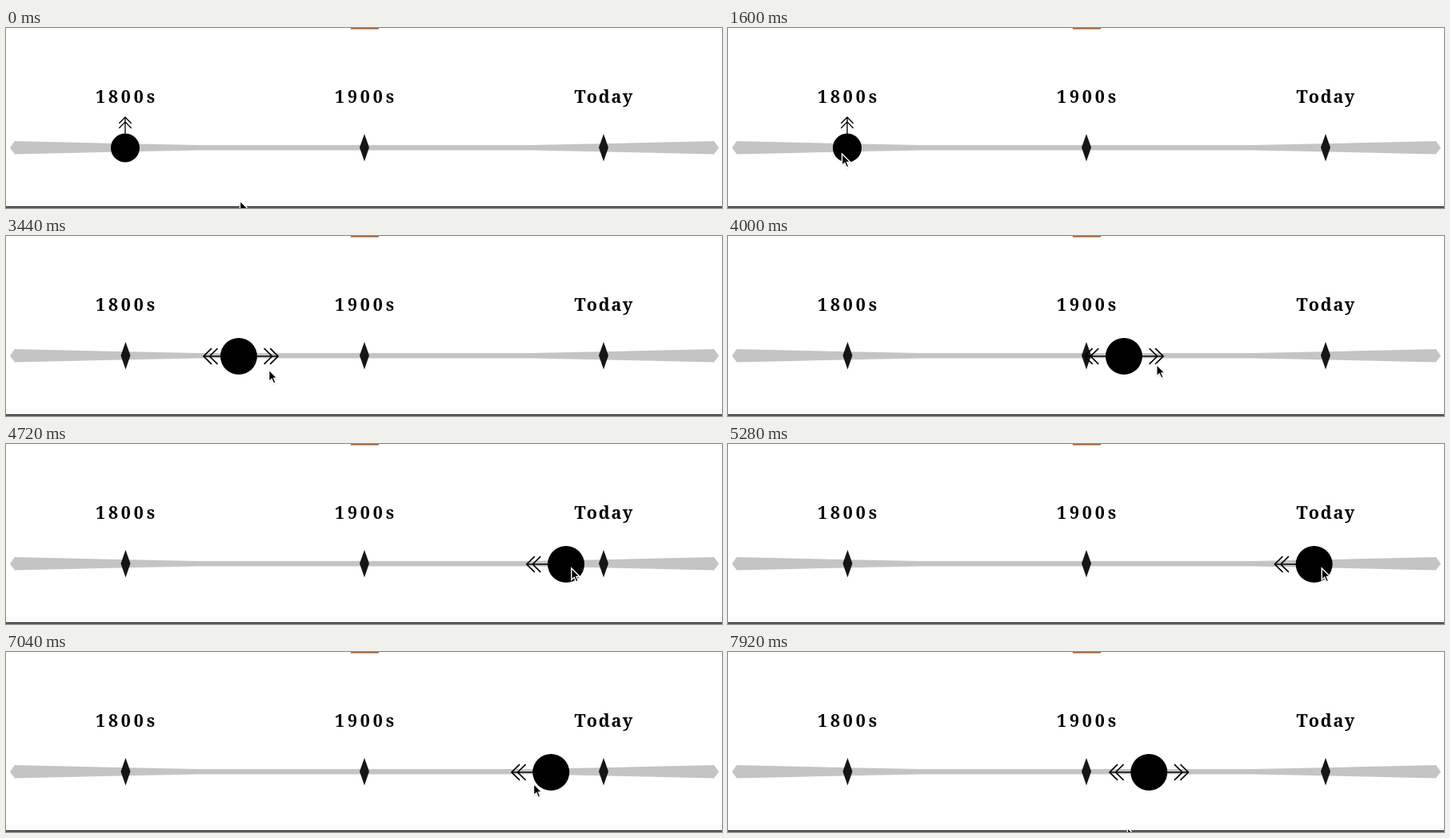
Recreate the animation shown at these times as an HTML page with a canvas. Size 895 px wide and 226 px high, loop 8000 ms.

```html
<!DOCTYPE html>
<html lang="en">
<head>
<meta charset="utf-8">
<title>Timeline slider</title>
<style>
  html, body { margin: 0; width: 100%; height: 100%; overflow: hidden; background: #fff; }
  canvas { display: block; }
</style>
</head>
<body>
<canvas id="stage" width="895" height="226"></canvas>
<script>
const ctx = document.getElementById('stage').getContext('2d');
const LOOP = 8000, STEP = 80;
const CENTER = 448, GAP = 299, AXIS_Y = 150.5;
const FIRST = CENTER - GAP, LAST = CENTER + GAP;
const REST_R = 18, DRAG_R = 23;

const clamp = v => Math.max(0, Math.min(1, v));

// Eased progress from 0 to 1 between two times
function ease(t, from, to) {
  const u = clamp((t - from) / (to - from));
  return u * u * (3 - 2 * u);
}

// Slow pull, fast sweep, slow approach, snap into place, then back
function knobX(t) {
  return FIRST
    + 115 * ease(t, 2000, 3440)
    + 436 * ease(t, 3210, 4730)
    + 34 * ease(t, 4700, 5360)
    + 14 * ease(t, 5440, 5760)
    - 228 * ease(t, 6460, 8080);
}

// 0 while parked on a marker, 1 while being dragged
function dragAmount(t) {
  return ease(t, 2000, 2320) - ease(t, 5440, 5760) + ease(t, 6560, 6880);
}

// The hand reaches the knob, leads it right, lets go, then leads it back
function pointerX(t) {
  return 292
    - 152 * ease(t, 0, 160)
    + 2 * ease(t, 720, 1600)
    + 156 * ease(t, 2000, 3440)
    + 407 * ease(t, 3200, 4640)
    + 38 * ease(t, 4640, 5360)
    - 16 * ease(t, 6060, 6220)
    - 230 * ease(t, 6500, 8000);
}

function pointerY(t) {
  return 217
    - 14 * ease(t, 0, 160)
    - 45 * ease(t, 720, 1600)
    + 11 * ease(t, 2000, 3440)
    - 13 * ease(t, 3200, 4640)
    + 2 * ease(t, 6060, 6220)
    + 63 * ease(t, 6800, 7920);
}

function polygon(points, color) {
  ctx.beginPath();
  points.forEach(([x, y]) => ctx.lineTo(x, y));
  ctx.closePath();
  ctx.fillStyle = color;
  ctx.fill();
}

function label(text, x, spacing) {
  ctx.letterSpacing = spacing + 'px';
  ctx.fillText(text, x, 94);
}

function drawTimeline() {
  // One half of the tapered bar, mirrored around the center
  const taper = [[208, 3.3], [318, 5.5], [437, 8.2], [443, 0]];
  for (const side of [-1, 1]) {
    const edge = sign => taper.map(([x, h]) => [CENTER + side * x, 150.2 + sign * h]);
    polygon([[CENTER, 146.9], ...edge(-1), ...edge(1).reverse(), [CENTER, 153.5]], '#c4c4c4');
  }
  for (const x of [FIRST + 0.5, CENTER, LAST])
    polygon([[x, 133], [x + 6, 150], [x, 167.5], [x - 6, 150]], '#161616');

  ctx.fillStyle = '#000';
  ctx.font = 'bold 21.5px "Noto Serif", serif';
  label('1800s', FIRST - 37, 3.9);
  label('1900s', CENTER - 37, 3.9);
  label('Today', LAST - 36.5, 1.8);

  ctx.fillRect(0, 224, 895, 1.5);
  ctx.fillStyle = '#b5561c';
  ctx.fillRect(431, 0, 35, 1.5);
}

// A double-headed arrow that slides out from behind the knob
function arrow(angle, extent, radius) {
  if (extent <= 0) return;
  const scale = radius / DRAG_R, tip = DRAG_R * (1 + 1.14 * extent);
  ctx.save();
  ctx.rotate(angle);
  ctx.scale(scale, scale);
  ctx.beginPath();
  ctx.moveTo(0, 0);
  ctx.lineTo(tip, 0);
  for (const x of [tip, tip - 7.5]) {
    ctx.moveTo(x - 10, -9.8);
    ctx.lineTo(x, 0);
    ctx.lineTo(x - 10, 9.8);
  }
  ctx.lineWidth = 1.7;
  ctx.strokeStyle = '#000';
  ctx.stroke();
  ctx.restore();
}

function drawKnob(t) {
  const x = knobX(t), drag = dragAmount(t);
  const radius = REST_R + (DRAG_R - REST_R) * drag;
  const room = distance => clamp((distance - 86) / 70) * drag;
  ctx.save();
  ctx.translate(x, AXIS_Y);
  arrow(-Math.PI / 2, 1 - drag, radius);
  ctx.translate(0, 0.5 * drag);
  arrow(Math.PI, room(x - FIRST), radius);
  arrow(0, room(LAST - x), radius);
  ctx.beginPath();
  ctx.arc(0, 0, radius, 0, Math.PI * 2);
  ctx.fillStyle = '#000';
  ctx.fill();
  ctx.restore();
}

function drawPointer(t) {
  ctx.save();
  ctx.translate(pointerX(t), pointerY(t));
  ctx.shadowColor = 'rgba(0,0,0,.3)';
  ctx.shadowBlur = 2;
  ctx.shadowOffsetY = 1;
  polygon([[0.5, 0], [0.5, 14.5], [4, 11.5], [6.3, 17], [8.9, 16], [6.7, 10.5], [11, 10.5]], '#000');
  ctx.shadowColor = 'transparent';
  ctx.lineWidth = 1.4;
  ctx.strokeStyle = '#fff';
  ctx.stroke();
  ctx.restore();
}

function frame(now) {
  const t = Math.floor((now % LOOP) / STEP) * STEP;
  ctx.fillStyle = '#fff';
  ctx.fillRect(0, 0, 895, 226);
  drawTimeline();
  drawKnob(t);
  drawPointer(t);
  requestAnimationFrame(frame);
}
requestAnimationFrame(frame);
</script>
</body>
</html>
```
